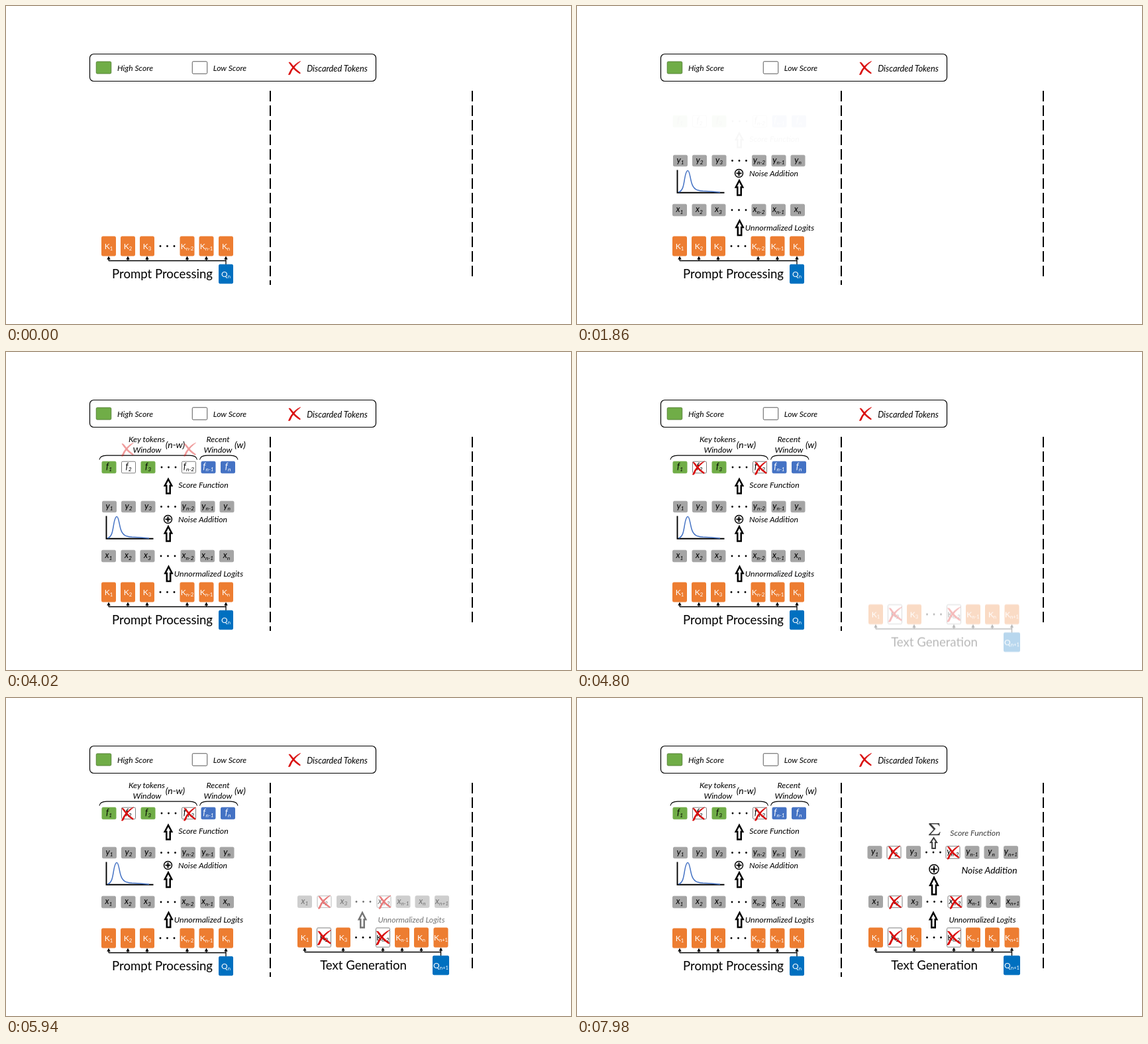
Animation of 853x480 px, one loop 8000 ms. Source, as an HTML page:

```html
<!DOCTYPE html>
<html lang="en">
<head>
<meta charset="utf-8">
<title>Token scoring</title>
<style>
  html, body { margin: 0; width: 100%; height: 100%; overflow: hidden; background: #fff; }
  svg { display: block; width: 853px; height: 480px; }
  text { font-family: Lato, "Open Sans", sans-serif; text-anchor: middle; }
  .it { font-style: italic; }
  .line { fill: none; stroke: #000; }
  .stage { animation: 8s linear infinite; }
  #logits  { animation-name: s1; }
  #noise   { animation-name: s2; }
  #score   { animation-name: s3; }
  #windows { animation-name: s4; }
  #discard { animation-name: s5; }
  #textgen { animation-name: s6; }
  #logits2 { animation-name: s7; }
  #noise2  { animation-name: s8; }
  #score2  { animation-name: s9; }
  @keyframes s1 { 0%, .325% { opacity: 0 } 11.625%, to { opacity: 1 } }
  @keyframes s2 { 0%, 11.625% { opacity: 0 } 22.925%, to { opacity: 1 } }
  @keyframes s3 { 0%, 22.925% { opacity: 0 } 34.225%, to { opacity: 1 } }
  @keyframes s4 { 0%, 34.225% { opacity: 0 } 45.525%, to { opacity: 1 } }
  @keyframes s5 {
    0%, 45.525% { opacity: 0; transform: translateY(-48px) }
    56.825%, to { opacity: 1; transform: none }
  }
  @keyframes s6 {
    0%, 56.825% { opacity: 0; transform: translateY(48px) }
    68.125%, to { opacity: 1; transform: none }
  }
  @keyframes s7 { 0%, 68.125% { opacity: 0 } 79.425%, to { opacity: 1 } }
  @keyframes s8 { 0%, 79.425% { opacity: 0 } 90.725%, to { opacity: 1 } }
  @keyframes s9 { 0%, 90.725% { opacity: 0 } to { opacity: .78 } }
</style>
</head>
<body>
<svg id="art" viewBox="0 0 853 480"></svg>
<script>
const ORANGE = '#ED7D31', GRAY = '#A5A5A5', GREEN = '#70AD47', BLUE = '#4472C4', NAVY = '#0070C0';
const LEFT = ['1', '2', '3', 'n-2', 'n-1', 'n'];
const RIGHT = [...LEFT, 'n+1'];

const text = (str, x, y, size, attrs = 'class="it"') =>
  `<text x="${x}" y="${y}" font-size="${size}" ${attrs}>${str}</text>`;

const box = (x, y, w, h, fill, stroke = fill) =>
  `<rect x="${x - w / 2}" y="${y - h / 2}" width="${w}" height="${h}" rx="1.6" fill="${fill}" stroke="${stroke}"/>`;

const label = (base, sub, x, y, size, color, cls) =>
  text(`${base}<tspan dy="2.6" font-size="${size * .64}">${sub}</tspan>`, x, y, size, `class="${cls}" fill="${color}"`);

const cross = (x, y, s = 1) =>
  `<path transform="translate(${x} ${y}) scale(${s})" fill="#D90A0A" stroke="#D90A0A" stroke-width=".8" stroke-linejoin="round"
    d="M-8.5-8.5Q-6-9-4.5-6Q0 1 9 7.5L8 8.6Q0 4-5-3.5ZM9-10Q1-4-4 4L-6.5 9.5Q-8 10.6-9 10Q-6 2 0-4Q4-8 9-10Z"/>`;

const dots = (x, y) => [-10.5, 0, 10.5].map(d => `<circle cx="${x + d}" cy="${y}" r="1.4"/>`).join('');

// Block arrow pointing up: tip at (x, top)
const arrow = (x, top, h, w = 5.2, stroke = 2.5) => {
  const neck = h * .48, s = w * .52;
  return `<path class="line" stroke-width="${stroke}" d="M${x} ${top + 2}l${w} ${neck - 2}h${s - w}v${h - neck - 1}h${-2 * s}v${neck + 1 - h}h${s - w}z"/>`;
};

const plus = (x, y, r) =>
  `<g class="line" stroke-width="1.5"><circle cx="${x}" cy="${y}" r="${r}"/>
   <path stroke-width="2" d="M${x - r + 2} ${y}h${2 * r - 4}M${x} ${y - r + 2}v${2 * r - 4}"/></g>`;

// Row of token boxes; style(i) gives [fill, stroke, text colour]
const row = (base, subs, xs, y, h, style, cls = 'it', size = 13) => subs.map((sub, i) => {
  const [fill, stroke, color] = style(i);
  return box(xs[i], y, 21, h, fill, stroke) + label(base, sub, xs[i], y + (cls ? 3 : 4), size, color, cls);
}).join('');

const isLow = i => i === 1 || i === 3;
const gray = () => [GRAY, GRAY, '#000'];
const orange = () => [ORANGE, ORANGE, '#fff'];
const dropped = style => i => isLow(i) ? ['#fff', '#7F7F7F', '#000'] : style(i);
const scored = i => i > 3 ? [BLUE, BLUE, '#fff'] : isLow(i) ? ['#fff', '#7F7F7F', '#000'] : [GREEN, GREEN, '#000'];

// Wire from the query box up to the keys
const wire = (xs, y, from) =>
  `<path class="line" stroke-width="1.3" d="M${xs[0]} ${y}H${from}V${y + 6}${xs.map(x => `M${x} ${y}v-4`).join('')}"/>` +
  xs.map(x => `<path d="M${x} ${y - 7}l2.7 5h-5.4z"/>`).join('');

const query = (sub, x, y, w) =>
  box(x, y, w, 28.5, NAVY) + label('Q', sub, x, y + 4, 12, '#fff', '');

const stage = (id, body) => `<g class="stage" id="${id}">${body}</g>`;

const bracket = (x1, x2) =>
  `<path class="line" stroke-width="1.2" d="M${x1} 162.5Q${x1 + 1} 156.5 ${x1 + 11} 156.2H${x2 - 11}Q${x2 - 1} 156.5 ${x2} 162.5"/>`;

const keysL = [155, 184, 213, 273.5, 302.5, 332];
const keysR = [451, 480, 509, 569, 598, 627, 656.5];

const legend =
  '<rect x="126.5" y="72.5" width="432" height="41" rx="6" class="line" stroke-width="1.2"/>' +
  box(147.5, 93, 22.5, 18, GREEN, '#548235') + text('High Score', 195, 98, 12.1) +
  box(292.5, 93, 22.5, 18.5, '#fff', '#595959') + text('Low Score', 338, 98, 12.1) +
  cross(435.5, 93.5) + text('Discarded Tokens', 500, 98.5, 12.8);

const dividers =
  '<path class="line" stroke-width="2" stroke-dasharray="16 6" d="M399 128V421M704 128V409"/>';

const prompt =
  row('K', LEFT, keysL, 362.5, 29, orange, '', 12) + dots(243.5, 362.5) +
  wire(keysL, 384.5, 332) + query('n', 332, 404.5, 21) +
  text('Prompt Processing', 236, 410.5, 18.6, '');

const curve =
  '<path class="line" stroke-width="1.9" d="M151.5 247.5V281.8H222.5"/>' +
  `<path fill="none" stroke="${BLUE}" stroke-width="1.5" d="M153.5 281C160 279 161 270 162.5 261C164 252 165.5 248.5 167.3 248.5C170 248.5 170.5 258 173 267C176 277 181 278.5 190 279.3Q203 280 216 281.3"/>`;

document.getElementById('art').innerHTML = legend + dividers + prompt +
  stage('logits',
    row('x', LEFT, [155, 184.5, 213.5, 274.5, 304, 333], 308, 17.5, gray) + dots(244.5, 308) +
    arrow(245.5, 322, 25) + text('Unnormalized Logits', 306, 339, 12.4)) +
  stage('noise',
    row('y', LEFT, [156, 185, 214.5, 275, 304.5, 333.5], 233.5, 16.5, gray) + dots(245, 233.5) +
    plus(244.5, 252.5, 6) + arrow(245, 261.5, 25) + curve + text('Noise Addition', 297, 256.5, 12.2)) +
  stage('score',
    row('f', LEFT, [155.5, 185, 214.5, 276, 305.5, 335], 174, 17.5, scored) + dots(245.5, 174) +
    arrow(245, 190, 24.5) + text('Score Function', 298, 204.5, 12.3)) +
  stage('windows',
    bracket(141, 288.5) + bracket(292.5, 350) +
    text('Key tokens', 212.5, 136, 12.4) + text('Window', 213, 152, 12.4) + text('(n-w)', 255.5, 144.5, 14) +
    text('Recent', 320, 136, 12.4) + text('Window', 320, 152, 12.4) + text('(w)', 353.5, 144.5, 14)) +
  stage('discard', cross(183.5, 175) + cross(277.5, 175)) +
  stage('textgen',
    row('K', RIGHT, keysR, 361.5, 29, dropped(orange), '', 12) + dots(539, 361.5) +
    wire(keysR.filter((x, i) => i !== 1), 383.5, 656.5) + query('n+1', 656.5, 403.5, 24) +
    cross(480.5, 361.5, 1.1) + cross(569, 361.5, 1.1) +
    text('Text Generation', 539.5, 409.5, 18.6, '')) +
  stage('logits2',
    row('x', RIGHT, [451, 480.5, 510, 570.5, 599.5, 628.5, 658], 307.5, 17.5, dropped(gray)) + dots(539.5, 307.5) +
    cross(480.5, 308) + cross(572, 308) +
    arrow(538, 322, 25.5) + text('Unnormalized Logits', 612, 339, 12)) +
  stage('noise2',
    row('y', RIGHT, [449.5, 478.5, 508, 567.5, 596.5, 625.5, 655], 233, 18.5, dropped(gray)) + dots(538, 233) +
    cross(479, 233) + cross(568, 233) +
    plus(539, 258.5, 7) + arrow(539, 269, 28.5, 5.8, 2.6) + text('Noise Addition', 622.5, 265, 13.9)) +
  stage('score2',
    '<path d="M531.5 189H547L547.6 193.6H546.7Q546 190.6 543 190.6H534.8L541.4 197.6L534 205.4H543.5Q546.5 205.4 547.8 202H548.6L547.3 207.3H531V206.3L538.4 198.4L531.5 191Z"/>' +
    arrow(538.5, 209, 19, 4.6, 2) + text('Score Function', 601, 208, 12.3));
</script>
</body>
</html>
```
